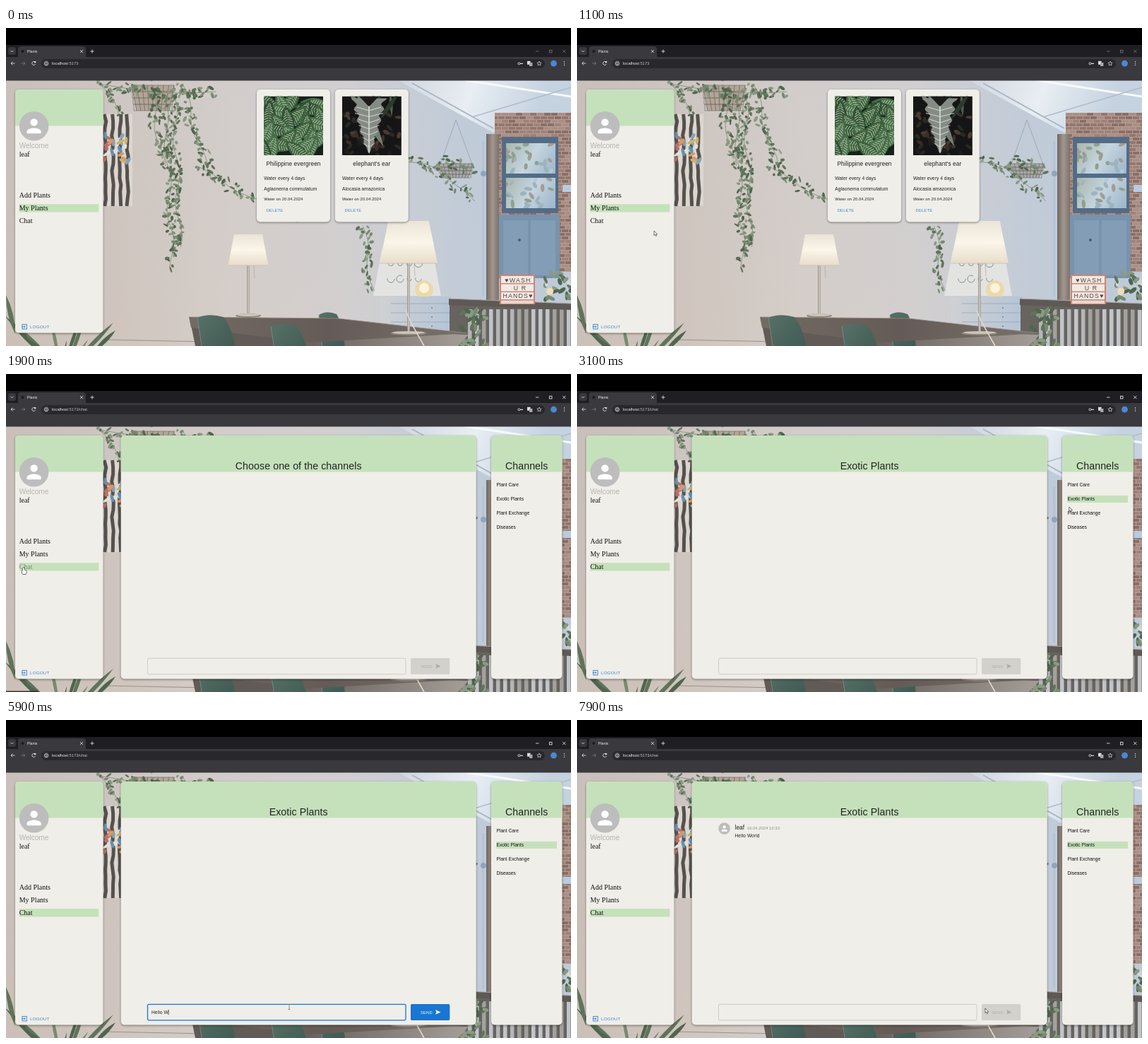
Animation of 800 by 450 pixels, one loop 8000 ms. Source, as an HTML page with a canvas:

```html
<!DOCTYPE html>
<html lang="en">
<head>
<meta charset="utf-8">
<title>Plants</title>
<style>
html, body { margin: 0; width: 100%; height: 100%; overflow: hidden; background: #000; }
canvas { display: block; width: 800px; height: 450px; }
</style>
</head>
<body>
<canvas id="stage"></canvas>
<script>
const W = 800, H = 450, LOOP = 8000, STEP = 100;
const SANS = '"Liberation Sans", Arial, sans-serif';
const SERIF = '"Liberation Serif", "Times New Roman", serif';
const PAPER = '#f0eee8', GREEN = '#c5e1bb', BLUE = '#1976d2', LINK = '#3584d6', ICON = '#ddd';
const INK = '#222', USER = 'leaf', MESSAGE = 'Hello World';
const LEAVES = ['#5f745b', '#768a6f', '#8a9a83', '#4f664e'];
const scale = Math.max(1, window.devicePixelRatio || 1);
const stage = document.getElementById('stage');
let g;

function makeLayer(canvas) {
  canvas.width = W * scale;
  canvas.height = H * scale;
  const c = canvas.getContext('2d');
  c.scale(scale, scale);
  return c;
}

let seed = 7;
const rnd = () => (seed = (seed * 16807) % 2147483647) / 2147483647;
const between = (a, b) => a + (b - a) * rnd();
const pick = list => list[Math.floor(rnd() * list.length)];
const clamp = v => Math.min(1, Math.max(0, v));
const ease = k => k * k * (3 - 2 * k);
const mix = (a, b, k) => a + (b - a) * k;
function times(n, draw) { for (let i = 0; i < n; i++) draw(i); }

function rect(x, y, w, h, color) { g.fillStyle = color; g.fillRect(x, y, w, h); }
function box(x, y, w, h, color, width = 0.9) {
  g.strokeStyle = color; g.lineWidth = width; g.strokeRect(x, y, w, h);
}
function round(x, y, w, h, r, color) {
  g.beginPath(); g.roundRect(x, y, w, h, r); g.fillStyle = color; g.fill();
}
function oval(x, y, rx, ry, color, turn = 0) {
  g.beginPath(); g.ellipse(x, y, rx, ry, turn, 0, 7); g.fillStyle = color; g.fill();
}
const dot = (x, y, r, color) => oval(x, y, r, r, color);
function ring(x, y, r, color, from = 0, to = 7) {
  g.beginPath(); g.arc(x, y, r, from, to); g.strokeStyle = color; g.lineWidth = 0.9; g.stroke();
}
function trace(p) {
  g.beginPath();
  for (let i = 0; i < p.length; i += 2) g.lineTo(p[i], p[i + 1]);
}
function poly(color, ...p) { trace(p); g.closePath(); g.fillStyle = color; g.fill(); }
function line(color, width, ...p) {
  trace(p); g.strokeStyle = color; g.lineWidth = width; g.stroke();
}
// upright trapezoid: half widths at top and bottom
function trap(x, y, h, top, bottom, color) {
  poly(color, x - top, y, x + top, y, x + bottom, y + h, x - bottom, y + h);
}
function chevron(x, y, r, turn, color = ICON) {
  g.save(); g.translate(x, y); g.rotate(turn);
  line(color, 0.9, -r, -r, 0, 0, -r, r);
  g.restore();
}
function cross(x, y, r, color) {
  line(color, 0.8, x - r, y - r, x + r, y + r);
  line(color, 0.8, x - r, y + r, x + r, y - r);
}
function text(str, x, y, size, color = INK, { font = SANS, space = 0, align = 'left' } = {}) {
  g.font = `${size}px ${font}`;
  g.letterSpacing = space + 'px';
  g.textAlign = align;
  g.fillStyle = color;
  g.fillText(str, x, y);
}
const body = (str, x, y, size = 6.67, color = INK) => text(str, x, y, size, color, { space: 0.06 });
const caps = (str, x, y, size, color) => text(str, x, y, size, color, { space: 0.17 });
const heading = (str, x, y, size, space) => text(str, x, y, size, INK, { space, align: 'center' });
function clipped(x, y, w, h, draw) {
  g.save(); g.beginPath(); g.rect(x, y, w, h); g.clip(); draw(); g.restore();
}
function fade(x0, y0, x1, y1, ...colors) {
  const f = g.createLinearGradient(x0, y0, x1, y1);
  colors.forEach((c, i) => f.addColorStop(i / (colors.length - 1), c));
  return f;
}

// ---- room behind the page ----
function vine(x0, y0, x1, y1, sag, spread = 7) {
  const length = Math.hypot(x1 - x0, y1 - y0), count = length / 2.6;
  const along = k => [
    mix(x0, x1, k) + 4 * Math.sin(k * length / 14),
    mix(y0, y1, k) + sag * 4 * k * (1 - k)
  ];
  const stem = [];
  times(25, i => stem.push(...along(i / 24)));
  line('#7f8a76', 0.8, ...stem);
  times(count, i => {
    const [x, y] = along(i / count);
    oval(x + between(-spread, spread), y + between(-spread, spread),
      between(2, 4.5), between(1.1, 2.2), pick(LEAVES), between(0, 3));
  });
}
function bush(x, y, w, h, count, colors = LEAVES) {
  times(count, () => oval(x + rnd() * w, y + rnd() * h, between(3, 7), between(2, 3), pick(colors), rnd() * 3));
}
function blade(x, y, tipX, tipY, width, color) {
  const nx = (y - tipY) * width, ny = (tipX - x) * width;
  const mx = (x + tipX) / 2, my = (y + tipY) / 2;
  g.beginPath(); g.moveTo(x, y);
  g.quadraticCurveTo(mx + nx, my + ny, tipX, tipY);
  g.quadraticCurveTo(mx - nx, my - ny, x, y);
  g.fillStyle = color; g.fill();
}
function basket(x, y, h, top, bottom, color) {
  trap(x, y, h, top, bottom, color);
  times(9, i => {
    const k = i / 4 - 1;
    line('#776f67', 0.9, x + k * top, y, x + k * bottom, y + h);
  });
  times(4, i => box(x - top + i, y + i * h / 4, 2 * (top - i), h / 4, '#776f67', 0.7));
}
function lamp(x, top, bottom, half, foot) {
  rect(x - 1.8, bottom, 3.6, foot - bottom, fade(x - 2, 0, x + 2, 0, '#867d75', '#d6d0c8', '#978d85'));
  oval(x, foot, half * 0.63, 3, '#8d847c');
  oval(x, foot - 1, half * 0.56, 2, '#cbc4bb');
  trap(x, top, bottom - top, half * 0.7, half, fade(0, top, 0, bottom, '#ebe4d7', '#fbf6ea', '#e8ddcb'));
  line('#cbbba3', 0.8, x - half, bottom, x + half, bottom);
  line('#b0a79d', 0.7, x + 8, bottom, x + 9, bottom + 18);
}
function chair(x, y, w) {
  g.beginPath(); g.moveTo(x, y + 4);
  g.quadraticCurveTo(x + w * 0.3, y - 3, x + w * 0.68, y + 3);
  g.quadraticCurveTo(x + w * 0.92, y + 18, x + w, y + 50);
  g.lineTo(x + w * 0.13, y + 50);
  g.fillStyle = fade(x, y, x + w, y + 45, '#587068', '#3f5b53'); g.fill();
  line('#7d928a', 0.8, x, y + 4, x + w * 0.13, y + 50);
}
function bricks(x, y, w, h) {
  clipped(x, y, w, h, () => {
    rect(x, y, w, h, '#b0a09a');
    times(h / 5, r => times(w / 10 + 1, k =>
      rect(x + k * 10 - (r % 2) * 5, y + r * 5, 9, 4, pick(['#96766c', '#a38177', '#8b6e66', '#ac8e84']))));
  });
}
function painting(x, y, w, h) {
  rect(x, y, w, h, '#ddd6cf');
  times(4, i => {
    const left = x + 2 + i * 10.5, edge = [];
    times(14, k => edge.push(left + between(-1, 2), y + h * k / 13));
    line('#55514f', 5, ...edge);
  });
  bush(x, y + 30, w - 6, 38, 24, ['#d59a6a', '#7fa5b8', '#cdb072', '#b9706a', '#5f93b3', '#e6e0d8']);
}
function windowAndDoor() {
  bricks(692, 120, 108, 225);
  rect(680, 150, 18, 235, fade(680, 0, 698, 0, '#6f6864', '#a3968d', '#7a726d'));
  rect(674, 160, 3, 220, '#b3c4d6');
  dot(676, 206, 4, '#8fa5bd');
  rect(788, 222, 12, 10, '#b8cbe0');
  rect(702, 154, 80, 108, '#536c86');
  times(2, i => {
    const y = 163 + i * 49;
    rect(708, y, 70, 43, fade(708, y, 778, y + 43, '#a8b7ad', '#c5d5df', '#9bb5cb'));
    clipped(708, y, 70, 43, () => bush(708, y, 70, 43, 22, ['#8fa18e', '#b4c8d8', '#a59b94', '#9db3bd']));
  });
  rect(698, 264, 86, 90, '#7893ad');
  times(2, i => rect(704 + i * 39, 272, 35, 78, '#839db6'));
  dot(727, 300, 2, '#4e5c6e');
}
function counter() {
  rect(628, 392, 172, 58, '#67635f');
  times(15, i => rect(654 + i * 10, 398, 5.5, 52, pick(['#b4b6b8', '#a3a19e', '#c1c5ca'])));
  bush(642, 400, 38, 50, 32);
  poly('#5f5955', 627, 383, 800, 390, 800, 399, 627, 392);
  line('#a59d97', 1.2, 627, 383, 800, 390);
  bush(762, 346, 38, 42, 26, [...LEAVES, '#d3d7d5']);
  dot(770, 373, 5, '#f1dcb6');
}
function signBoard() {
  rect(699, 349, 50, 42, '#cf8473');
  ['♥WASH', 'U R', 'HANDS♥'].forEach((word, i) => {
    rect(701, 351 + i * 11.5, 46, 10, '#f0e9e4');
    text(word, 725 + (i % 2) * 3, 359.5 + i * 11.3, 8.8, '#54484a', { space: 1.2, align: 'center' });
  });
  rect(701, 385.5, 46, 4.5, '#e6d8d2');
}
function desk() {
  trap(568, 315, 64, 36, 48, '#e3e4e2');
  times(8, i => ring(545 + (i % 4) * 13, 333 + (i >> 2) * 22, between(3, 6), '#7b878b', 0, between(3, 6)));
  dot(592, 370, 13, '#ead9ad');
  dot(592, 368, 7, '#fbf3da');
  rect(530, 380, 100, 60, fade(530, 0, 630, 0, '#cfd1d4', '#b5c5d6'));
  times(4, i => {
    line('#95a5b5', 0.8, 545, 390 + i * 13, 628, 390 + i * 13);
    dot(603, 396 + i * 13, 1, '#6f7f8f');
  });
}
function table() {
  poly(fade(400, 0, 655, 0, '#625a56', '#a49d98'), 262, 420, 655, 434, 640, 450, 268, 450);
  chair(443, 402, 37);
  poly(fade(260, 408, 655, 438, '#746a64', '#645b56', '#7b716b'), 259, 409, 470, 411, 655, 432, 430, 445, 262, 424);
  line('#958b84', 0.8, 259, 409, 470, 411, 655, 432);
}
function room() {
  rect(0, 74, W, H, fade(0, 0, W, 0, '#cbbfb7', '#d0c6bf', '#d6cfcb', '#d4d1d2', '#c1cddb', '#bccbdc'));
  rect(0, 74, W, H, fade(0, 74, 0, H, 'rgba(190,195,205,.16)', 'rgba(205,195,185,.12)'));
  poly(fade(560, 74, 740, 150, '#d0d7df', '#e8eef3', '#c5d2e0'), 555, 74, 800, 74, 800, 122, 690, 148);
  line('#a9b5c3', 2, 575, 78, 690, 142);
  line('#f7f9fa', 3, 650, 74, 800, 97);
  line('#aebccb', 1.5, 660, 126, 800, 84);
  line('#9b928a', 1, 137, 441, 285, 444);

  painting(138, 122, 41, 130);
  windowAndDoor();
  desk();
  basket(208, 81, 36, 30, 23, '#b3a598');
  basket(637, 192, 20, 24, 17, '#a7aaab');
  line('#8f9aa4', 0.7, 615, 193, 637, 130, 660, 193);
  vine(137, 80, 300, 90, 6);
  vine(137, 84, 160, 122, 0, 5);
  vine(225, 98, 236, 338, 10);
  vine(238, 95, 246, 310, 0, 5);
  vine(205, 80, 222, 195, 0, 9);
  vine(250, 80, 285, 205, 0, 9);
  vine(270, 195, 430, 270, 8);
  vine(570, 190, 660, 245, -14);
  vine(615, 185, 660, 200, 0, 8);
  vine(505, 280, 520, 372, 0);
  counter();
  signBoard();
  table();
  lamp(343, 292, 336, 28.5, 407);
  lamp(570, 273, 333, 41, 432);
  line('#e5d9ca', 1.6, 566, 400, 574, 418, 592, 450);
  chair(271, 406, 54);
  chair(375, 418, 53);

  times(9, i => blade(60 + i * 5, 470, between(-10, 14) + i * 18, between(405, 444), 0.08, pick(LEAVES)));
  blade(0, 378, 13, 433, 0.12, LEAVES[0]);
  blade(124, 458, 155, 428, 0.14, LEAVES[3]);
}

// ---- browser frame ----
function browser() {
  rect(0, 0, W, 24, '#000');
  rect(0, 24, W, 17, '#1f1f23');
  rect(0, 41, W, 33.5, '#3a393d');
  round(3, 27, 11, 11, 3, '#39383c');
  chevron(8.5, 33.8, 2, Math.PI / 2);
  round(17, 26, 96, 17, [4, 4, 0, 0], '#3a393d');
  dot(23.5, 33, 2, '#1d1c1f');
  text('Plants', 30, 35, 5.2, '#eee');
  cross(107, 33, 2, ICON);
  line(ICON, 0.9, 119.5, 33, 124.5, 33);
  line(ICON, 0.9, 122, 30.5, 122, 35.5);
  line(ICON, 0.9, 7, 50, 12.5, 50);
  chevron(7, 50, 2.4, Math.PI);
  line('#777', 0.9, 21.5, 50, 27, 50);
  chevron(27, 50, 2.4, 0, '#777');
  ring(39.3, 50, 2.5, ICON, 0.4, 5.6);
  rect(40, 47, 2.3, 2.3, ICON);
  round(50, 44, 713, 13, 6.5, '#28272b');
  dot(57, 50.2, 4.6, '#3a393d');
  ring(57, 50.2, 2.5, ICON);
  rect(56.6, 49, 0.8, 2.6, ICON);
  ring(726.4, 50.3, 1.5, ICON);
  rect(728, 49.8, 4, 1.2, ICON);
  rect(738, 46.8, 4.6, 5, ICON);
  rect(741, 49, 4.4, 5, '#aaa');
  const star = [];
  times(11, i => {
    const a = i * Math.PI / 5 - Math.PI / 2, r = i % 2 ? 1.5 : 3.3;
    star.push(755 + r * Math.cos(a), 50.3 + r * Math.sin(a));
  });
  line(ICON, 0.7, ...star);
  dot(775.5, 50.2, 4.4, '#4d86d6');
  times(3, i => dot(790.5, 47.8 + i * 2.3, 0.7, ICON));
}
function windowState(active, route) {
  const c = active ? '#f2f2f2' : '#77777a';
  line(c, 0.8, 750, 33, 754.5, 33);
  box(769.4, 31.3, 3.6, 3.6, c, 0.8);
  cross(790.3, 33, 2.1, c);
  text('localhost', 65, 52.3, 5.8, '#eee');
  text(':5173' + route, 65 + g.measureText('localhost').width, 52.3, 5.8, '#c3c3c5');
}

// ---- page parts ----
function panel(x, w, h, head = 0) {
  g.save();
  g.shadowColor = 'rgba(0,0,0,.45)'; g.shadowBlur = 3 * scale; g.shadowOffsetY = scale;
  round(x, 87, w, h, 5, PAPER);
  g.restore();
  if (head) round(x, 87, w, head, [5, 5, 0, 0], GREEN);
}
function avatar(x, y, r) {
  const s = r / 2;
  dot(x, y, r, '#bdbdbd');
  dot(x, y - s * 0.52, s * 0.5, '#fff');
  clipped(x - s, y, 2 * s, s, () => oval(x, y + s * 0.78, s, s * 0.52, '#fff'));
}
function sidebar(current, hover) {
  panel(13, 124.5, 344.5, 51.5);
  avatar(39.6, 138.8, 20.8);
  text('Welcome', 18.7, 169.8, 10, '#b4b4b2');
  text(USER, 18.7, 182, 10, '#111', { font: SERIF });
  ['Add Plants', 'My Plants', 'Chat'].forEach((label, i) => {
    const y = 240.3 + i * 18;
    if (label === current) rect(18.7, y - 9.1, 112.6, 11.3, GREEN);
    text(label, 18.7, y, 10, label === hover ? '#808080' : '#111', { font: SERIF });
  });
  box(23, 419.4, 6.4, 6.6, LINK);
  line(LINK, 0.9, 22, 422.7, 27, 422.7);
  chevron(27.4, 422.7, 1.8, 0, LINK);
  caps('LOGOUT', 34, 425, 6.25, LINK);
}
function evergreen(x, y) {
  rect(x, y, 84, 84, '#16221a');
  times(26, i => {
    g.save();
    g.translate(x + (i * 37 % 84), y + 6 + i * 3);
    g.rotate(between(0.1, 2.4));
    blade(-23, 0, 23, 0, 0.4, pick(['#3c5f3c', '#2f5033', '#48704a']));
    times(11, k => {
      const px = k * 3.4 - 17, h = 7 * (1 - px * px / 400);
      line('#a3b899', 1.2, px + 3, -h, px, 0, px + 3, h);
    });
    line('#3f6240', 0.9, -22, 0, 22, 0);
    g.restore();
  });
}
function alocasia(x, y) {
  rect(x, y, 84, 84, '#161515');
  bush(x, y + 25, 84, 60, 45, ['#3b2e28', '#272b24', '#4a3b34', '#1f1d1c']);
  times(7, i => blade(x + 8 + i * 12, y - 5, x + between(0, 84), y + between(25, 75), 0.14, pick(['#2b3a2f', '#4f5d52', '#737f76'])));
  const cx = x + 38, reach = k => 25 * Math.pow(1 - k, 0.75) * (0.88 + 0.14 * Math.cos(k * 31));
  const left = [], right = [];
  times(31, i => {
    const k = i / 30;
    left.push(cx - reach(k), y + 3 + k * 78);
    right.unshift(cx + reach(k), y + 3 + k * 78);
  });
  poly('#858c85', ...left, ...right);
  poly('#1b1b1a', cx - 14, y, cx, y + 15, cx + 14, y);
  line('#dfe2da', 1.5, cx, y + 14, cx, y + 80);
  times(7, i => {
    const k = 0.12 + i * 0.11, w = reach(k), top = y + 3 + k * 78;
    line('#d5dad0', 1, cx - w, top + 3, cx, top + 8, cx + w, top + 3);
  });
}
function card(x, title, latin, photo) {
  const left = x + 10.2;
  panel(x, 104, 187.5);
  clipped(left, 96.6, 83.8, 83.5, () => photo(left, 96.6));
  heading(title, x + 52, 195, 8.33, 0.06);
  body('Water every 4 days', left, 215.4);
  body(latin, left, 230.4);
  body('Water on 20.04.2024', left, 243.8, 5.83);
  caps('DELETE', x + 13.7, 259.8, 5.83, LINK);
}
function inputFrame(focused) {
  g.beginPath(); g.roundRect(200.5, 402.3, 365.5, 22.5, 1.7);
  g.strokeStyle = focused ? BLUE : '#c6c4bf';
  g.lineWidth = focused ? 1.3 : 0.8; g.stroke();
}
function sendButton(on) {
  const face = (alpha, back, front) => {
    g.globalAlpha = alpha;
    round(573, 402, 55.3, 23, 1.7, back);
    caps('SEND', 587, 415.5, 5.83, front);
    poly(front, 608, 410, 615.6, 413.4, 608, 416.8, 609.5, 413.4);
    g.globalAlpha = 1;
  };
  face(1, '#d3d1cc', '#b0aea9');
  if (on > 0) face(on, BLUE, '#fff');
}

// ---- timeline ----
const at = { mouse: 200, focusWindow: 1700, chat: 1900, channel: 3000, focusInput: 4100, typing: 4800, blur: 7500, sent: 7600 };
const stops = [
  { x: 264, y: 311, leave: 200 },
  { x: 25, y: 274, arrive: 1700, leave: 2100 },
  { x: 714, y: 175, arrive: 2800, leave: 3000 },
  { x: 404, y: 410, arrive: 3700, leave: 4800 },
  { x: 401, y: 406, arrive: 5200, leave: 6800 },
  { x: 578, y: 408, arrive: 7400 }
];
function mouse(t) {
  const i = Math.max(1, stops.findLastIndex(s => t >= s.leave) + 1);
  const a = stops[i - 1], b = stops[i];
  const k = ease(clamp((t - a.leave) / (b.arrive - a.leave)));
  return { x: mix(a.x, b.x, k), y: mix(a.y, b.y, k) };
}
const inside = (m, x, y, w, h) => m.x >= x && m.x <= x + w && m.y >= y && m.y <= y + h;

// keys pressed in three bursts, each with its own pace
const burst = (t, from, pace, keys) => Math.min(keys, Math.max(0, Math.floor((t - from) / pace) + 1));
const typedKeys = t => burst(t, at.typing, 250, 3) + burst(t, 5500, 50, 3) + burst(t, 5900, 100, 5);
function caretShown(t) {
  return t < at.typing ? (t - at.focusInput) % 1000 < 500 : t < 6900;
}

function drawCursor(m, kind) {
  g.save(); g.translate(m.x, m.y); g.lineJoin = 'round';
  if (kind === 'beam') {
    line('#77756f', 0.8, 0, -3.5, 0, 3.5);
    times(2, i => line('#77756f', 0.8, -1.5, i * 7 - 3.5, 1.5, i * 7 - 3.5));
  } else if (kind === 'hand') {
    g.beginPath();
    g.roundRect(-0.9, 0, 1.8, 6, 0.9);
    g.roundRect(-2.2, 3.6, 6, 5.4, 1.6);
    g.strokeStyle = '#333'; g.lineWidth = 1.3; g.stroke();
    g.fillStyle = '#fff'; g.fill();
  } else {
    const p = [0, 0, 0, 6.6, 1.6, 5.2, 3, 7.6, 3, 4.9, 4.6, 4.8, 0, 0];
    poly('#fff', ...p);
    line('#333', 0.7, ...p);
  }
  g.restore();
}

function composer(t) {
  const focused = t >= at.focusInput && t < at.blur;
  const draft = t < at.sent ? MESSAGE.slice(0, typedKeys(t)) : '';
  inputFrame(focused);
  body(draft, 206, 415.8);
  if (focused && caretShown(t)) rect(206 + g.measureText(draft).width, 409.8, 0.8, 7.4, '#333');
  const ramp = from => clamp((t - from + 50) / 250);
  sendButton(ramp(at.typing) * (1 - ramp(at.sent)));
}
function chatPage(t) {
  const chosen = t >= at.channel;
  panel(162.7, 503, 344.5, 51.5);
  heading(chosen ? 'Exotic Plants' : 'Choose one of the channels', 414.2, 134.7, 14.17, 0.1);
  panel(687, 100.5, 344.5, 51.5);
  heading('Channels', 737.2, 134.7, 14.17, 0.1);
  ['Plant Care', 'Exotic Plants', 'Plant Exchange', 'Diseases'].forEach((label, i) => {
    if (chosen && i === 1) rect(694.3, 172, 85.7, 10, GREEN);
    text(label, 694.5, 159.2 + i * 20, 6.67, '#111');
  });
  composer(t);
  if (t >= at.sent) {
    avatar(208.6, 153.6, 8.4);
    body(USER, 223.5, 155.4, 8.33);
    body('16.04.2024 12:33', 240.6, 155.4, 5.83, '#888');
    body(MESSAGE, 223.5, 165.8);
  }
}

// still parts are painted once
function layer(draw) {
  const canvas = document.createElement('canvas');
  g = makeLayer(canvas);
  draw();
  return canvas;
}
const backdrop = layer(() => { room(); browser(); });
const cards = layer(() => {
  card(355, 'Philippine evergreen', 'Aglaonema commutatum', evergreen);
  card(465.8, "elephant's ear", 'Alocasia amazonica', alocasia);
});
const screen = makeLayer(stage);

function render(t) {
  g = screen;
  const m = mouse(t), chat = t >= at.chat, shown = t >= at.mouse;
  const overChat = shown && inside(m, 18, 266, 113, 13);
  g.drawImage(backdrop, 0, 0, W, H);
  windowState(t >= at.focusWindow, chat ? '/chat' : '');
  sidebar(chat ? 'Chat' : 'My Plants', overChat ? 'Chat' : '');
  if (chat) chatPage(t);
  else g.drawImage(cards, 0, 0, W, H);
  if (overChat) rect(0, 448.6, 46, 2, '#2b2a2d');
  if (!shown) return;
  const overLink = overChat || chat && inside(m, 694, 170, 86, 14);
  const overSend = chat && t < at.sent && inside(m, 573, 402, 55, 23);
  const overInput = chat && inside(m, 200, 402, 366, 23);
  drawCursor(m, overLink || overSend ? 'hand' : overInput ? 'beam' : 'arrow');
}

const start = performance.now();
function tick() {
  const t = (performance.now() - start) % LOOP;
  render(Math.floor(t / STEP) * STEP);
  requestAnimationFrame(tick);
}
tick();
</script>
</body>
</html>
```
